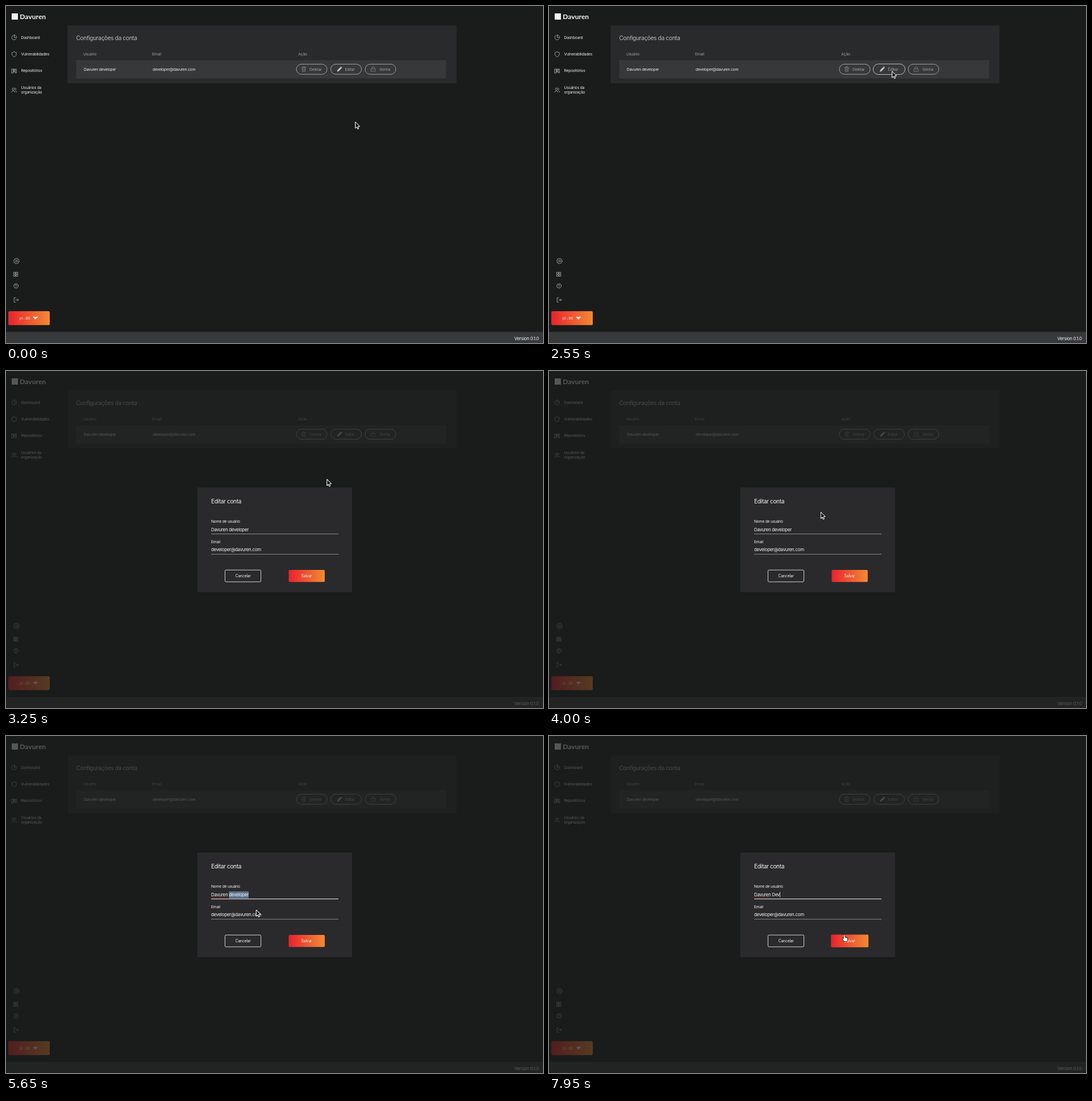
An HTML page with a canvas for the animation above (8000 ms loop, 945 px wide and 593 px high).

```html
<!DOCTYPE html>
<html lang="pt-BR">
<head>
<meta charset="utf-8">
<title>Configurações da conta</title>
<style>
html, body { margin: 0; width: 100%; height: 100%; overflow: hidden; background: #1a1c1b; }
canvas { display: block; width: 945px; height: 593px; }
</style>
</head>
<body>
<canvas id="stage"></canvas>
<script>
const W = 945, H = 593, LOOP = 8000, STEP = 50;
const BRAND = 'Davuren', USER = BRAND + ' developer', MAIL = 'developer@davuren.com';
const canvas = document.getElementById('stage');
const ctx = canvas.getContext('2d');
const dpr = window.devicePixelRatio || 1;
canvas.width = Math.round(W * dpr);
canvas.height = Math.round(H * dpr);

// Pointer path: time, x, y of the hot spot
const PATH = [
  [1150, 614.5, 204], [1400, 617, 184.3], [1550, 617, 184.3], [1900, 608.5, 128.3],
  [2050, 608.5, 128.3], [2300, 603.5, 115], [2850, 603.5, 115], [3250, 564.5, 190.5],
  [3350, 544.5, 204.3], [3400, 544.5, 204.3], [3550, 538.3, 209.2], [3700, 538.3, 209.2],
  [4150, 448, 268], [4550, 411, 280], [4600, 411, 280], [4650, 409.7, 280],
  [5400, 409.7, 280], [5650, 440, 306], [7200, 440, 306], [7600, 493, 333],
  [7700, 493, 333], [7900, 519.5, 350]
];

const ramp = (t, a, b) => Math.min(1, Math.max(0, (t - a) / (b - a)));
const mix = (a, b, k) => a + (b - a) * k;
const inside = ([x, y], l, t, r, b) => x >= l && x <= r && y >= t && y <= b;

function pointerAt(t) {
  const i = PATH.findIndex(p => p[0] > t);
  if (i === 0) return PATH[0].slice(1);
  if (i < 0) return PATH[PATH.length - 1].slice(1);
  const a = PATH[i - 1], b = PATH[i], k = ramp(t, a[0], b[0]);
  return [mix(a[1], b[1], k), mix(a[2], b[2], k)];
}

function setFont(size, family = 'Inter, sans-serif', weight = 400, spacing = -0.035) {
  ctx.font = `${weight} ${size}px ${family}`;
  ctx.letterSpacing = `${size * spacing}px`;
}

// y is the middle of the capital letters
function text(s, x, y, size, color, align = 'left') {
  setFont(size);
  ctx.textAlign = align;
  ctx.fillStyle = color;
  ctx.fillText(s, x, y + size * 0.364);
}

function box(x, y, w, h, r, fill, stroke, line = 0.9) {
  ctx.beginPath();
  ctx.roundRect(x, y, w, h, r);
  if (fill) { ctx.fillStyle = fill; ctx.fill(); }
  if (stroke) { ctx.strokeStyle = stroke; ctx.lineWidth = line; ctx.stroke(); }
}

function warm(x, w) {
  const g = ctx.createLinearGradient(x, 0, x + w, 0);
  g.addColorStop(0, '#ea222d');
  g.addColorStop(1, '#f38a34');
  return g;
}

// Outline icon centred on x, y
function icon(x, y, d, color = '#b4b5b5', line = 0.8, fill = false) {
  ctx.save();
  ctx.translate(x, y);
  ctx.lineWidth = line;
  ctx.lineJoin = ctx.lineCap = 'round';
  ctx.strokeStyle = ctx.fillStyle = color;
  const p = new Path2D(d);
  if (fill) ctx.fill(p);
  ctx.stroke(p);
  ctx.restore();
}

function grow(cx, cy, k, draw) {
  ctx.save();
  ctx.translate(cx, cy);
  ctx.scale(k, k);
  ctx.translate(-cx, -cy);
  draw();
  ctx.restore();
}

const ring = r => `M${r} 0A${r} ${r} 0 1 1 ${-r} 0A${r} ${r} 0 1 1 ${r} 0Z`;

function gearPath() {
  let d = '';
  for (let i = 0; i < 32; i++) {
    const a = (i + 0.5) / 32 * Math.PI * 2, r = i % 4 < 2 ? 5 : 3.9;
    d += `${i ? 'L' : 'M'}${r * Math.cos(a)} ${r * Math.sin(a)}`;
  }
  return d + 'Z' + 'M1.6 0A1.6 1.6 0 1 1 -1.6 0A1.6 1.6 0 1 1 1.6 0Z';
}
const GEAR = gearPath();
const TRASH = 'M-3.8 -2.6H3.8M-1.5 -2.8V-4.2H1.5V-2.8M-2.9 -2.4L-2.4 4.2H2.4L2.9 -2.4M-1 -0.8V2.7M1 -0.8V2.7';
const PENCIL = 'M-3.9 3.9L-3.3 1.6L1.4 -3.1L3.1 -1.4L-1.6 3.3ZM2.1 -3.7L2.7 -4.1L4 -2.8L3.6 -2.2Z';
const LOCK = 'M-3.7 -0.4H3.7V4H-3.7ZM-2.2 -0.5V-2A2.2 2.2 0 0 1 2.2 -2V-0.5';

function sidebar() {
  box(10, 13, 11, 11, 0, '#f2f2f2');
  setFont(12.1, 'Lato, sans-serif', 700, 0);
  ctx.textAlign = 'left';
  ctx.fillStyle = '#f7f7f7';
  ctx.fillText(BRAND, 24.3, 22.8);

  const items = [['Dashboard', 55.5], ['Vulnerabilidades', 85], ['Repositórios', 114],
    ['Usuários da', 143.8], ['organização', 152]];
  for (const [s, y] of items) text(s, 26.5, y, 6.8, '#ececec');

  icon(14.3, 55.3, 'M3.9 1.6A4.2 4.2 0 1 1 -1.5 -3.9M0.2 -4.3V0H4.4A4.3 4.3 0 0 0 0.2 -4.3Z');
  icon(14.3, 85, 'M0 -4.5C1.3 -3.5 2.5 -3.3 3.8 -3.2V0C3.8 2.2 2 3.8 0 4.5C-2 3.8 -3.8 2.2 -3.8 0V-3.2C-2.5 -3.3 -1.3 -3.5 0 -4.5Z');
  icon(14, 114.5, 'M-3.8 -3.6H-1.4V3.6H-3.8ZM0 -3.6H1.2V1.6H0ZM2.6 -3.6H4.4V3H2.6Z');
  icon(14.4, 148, 'M0.4 -1.8A1.9 1.9 0 1 1 -3.4 -1.8A1.9 1.9 0 1 1 0.4 -1.8M-4.4 3.6C-4.2 0.6 1.2 0.6 1.4 3.6M1.5 -3.6A1.8 1.8 0 0 1 1.8 -0.1M2.4 1.2C3.6 1.5 4.2 2.4 4.3 3.6');
  icon(18.4, 448.8, GEAR);
  icon(17.2, 472, 'M-3.5 -3.5H-0.7V-0.7H-3.5ZM0.8 -3.5H3.6V-0.7H0.8ZM-3.5 0.8H-0.7V3.6H-3.5ZM0.8 0.8H3.6V3.6H0.8Z');
  icon(17.6, 492.5, ring(3.9) + 'M-1.2 -0.9A1.2 1.2 0 1 1 0.5 0.1L0 0.5V0.8M0 1.9V2');
  icon(17.8, 517.2, 'M-0.8 -3.9H-3.6V3.9H-0.8M-1 0H4M2.2 -1.8L4 0L2.2 1.8');

  box(4, 537, 73, 24.5, 2, warm(4, 73));
  text('pt - BR', 24, 549.5, 5.9, '#ffe9e4');
  icon(52, 549.2, 'M-4 -2L4 -2L0 2Z', '#fff', 0.5, true);
}

function pill(x, label, path, hover = 0, fill = false) {
  grow(x + 27, 111.2, 1 + 0.04 * hover, () => {
    box(x, 102.4, 54, 17.7, 8.85, null, hover ? '#d0d0d0' : '#b3b3b4', 0.85);
    icon(x + 13 + (fill ? 2.6 : 1.2 * (label === 'Senha')), 111, path, fill ? '#c8c8c8' : '#8f9092', 0.7, fill);
    text(label, label === 'Deletar' ? x + 23 : x + 25, 111.3, 6.8, '#a2a2a4');
  });
}

function page(hover) {
  ctx.fillStyle = '#1a1c1b';
  ctx.fillRect(0, 0, W, H);
  sidebar();

  box(108.4, 34.5, 684.4, 101.5, 1, '#292a2c');
  text('Configurações da conta', 123.5, 56.2, 10.15, '#bcbcbd');
  text('Usuário', 136, 84.4, 6.75, '#a0a0a2');
  text('Email', 257, 84.4, 6.75, '#a0a0a2');
  text('Ação', 514.3, 84.4, 6.75, '#a0a0a2');
  box(123.5, 95.3, 651, 32.2, 1, '#37383a');
  text(USER, 137, 111.4, 6.75, '#f0f0f0');
  text(MAIL, 258, 111.4, 6.75, '#f0f0f0');
  pill(511, 'Deletar', TRASH);
  pill(571.5, 'Editar', PENCIL, hover, true);
  pill(632, 'Senha', LOCK);

  ctx.fillStyle = '#38393b';
  ctx.fillRect(0, 573.5, W, 19.5);
  text('Version 0.1.0', 937.8, 584.8, 7.9, '#f4f4f4', 'right');
}

function nameField(t) {
  const size = 7.9, x = 361;
  setFont(size);
  const brandW = ctx.measureText(BRAND).width;
  const wordX = x + ctx.measureText(BRAND + ' ').width;
  const word = t < 6150 ? 'developer' : 'Dev'.slice(0, t < 6350 ? 1 : t < 6600 ? 2 : 3);
  const endX = wordX + ctx.measureText(word).width;

  if (t >= 5450 && t < 6150) {
    ctx.fillStyle = '#5d7690';
    ctx.fillRect(wordX, 273.5, endX - wordX, 12);
  }
  text(BRAND, x, 278.8, size, '#f4f4f4');
  text(word, wordX, 278.8, size, '#f4f4f4');

  if (t >= 5300) {
    ctx.fillStyle = 'rgba(214, 48, 48, .75)';
    for (let d = x + 0.8; d < x + brandW; d += 1.9) {
      ctx.beginPath();
      ctx.arc(d, 283.4, 0.6, 0, 7);
      ctx.fill();
    }
  }
  if (t >= 6150 && t < 7200 || t >= 7750) {
    ctx.fillStyle = '#f4f4f4';
    ctx.fillRect(endX + 0.2, 274, 0.7, 10);
  }
  ctx.fillStyle = t >= 5100 ? '#c4c4c5' : '#79797b';
  ctx.fillRect(x, 286, 224, 1.3);
}

function modal(t) {
  ctx.fillStyle = 'rgba(26, 28, 27, .72)';
  ctx.fillRect(0, 0, W, H);
  box(336.6, 205, 272.4, 184.3, 1.5, '#2a2a2c');
  text('Editar conta', 361, 229.3, 10.15, '#f4f4f4');

  const k = ramp(t, 2600, 2800), size = mix(7.9, 6.75, k);
  text('Nome de usuário', 361, mix(265.2, 264.9, k), size, '#f4f4f4');
  text('Email', 361, mix(301.3, 300.4, k), size, '#f4f4f4');
  nameField(t);
  text(MAIL, 361, 314.3, 7.9, '#f4f4f4');
  ctx.fillStyle = '#79797b';
  ctx.fillRect(361, 321.8, 224, 1.2);

  box(385.4, 350.2, 63.2, 20.8, 2, null, '#e6e6e6', 0.9);
  text('Cancelar', 417, 360.5, 6.9, '#f4f4f4', 'center');
  grow(529.2, 360.6, 1 + 0.04 * ramp(t, 7800, 7950), () => {
    box(497.5, 350, 63.4, 21.3, 2, warm(497.5, 63.4));
    text('Salvar', 529, 360.5, 6.9, '#fff1ea', 'center');
  });
}

function cursor(t, open) {
  const p = pointerAt(t);
  const onButton = open ? inside(p, 497, 349, 561, 371)
    : t < 2550 && inside(p, 571, 102, 626, 120);
  const onField = open && (inside(p, 361, 272, 585, 287) || inside(p, 361, 308, 585, 323));
  if (onButton) {
    icon(p[0], p[1], 'M-0.9 0.6C-0.9 -0.5 0.8 -0.5 0.9 0.6L1.1 4.2C1.6 3.7 2.6 3.9 2.8 4.6C3.4 4.2 4.3 4.4 4.5 5.2C5.2 4.9 6 5.3 6 6.2C6 8.2 5.2 9 4.9 11.3H-0.4C-0.9 9.4 -2.4 8.4 -3.3 6.9C-3.8 5.9 -2.7 5.3 -2 6L-0.7 7.2Z', '#1a1a1a', 1.2);
    icon(p[0], p[1], 'M-0.6 0.7C-0.6 -0.1 0.5 -0.1 0.6 0.7L1 4.6L5.5 6C5.6 8 4.9 9 4.6 10.9H-0.1C-0.6 9 -2.2 8 -2.9 6.7C-3.2 6 -2.5 5.9 -2.1 6.4L-0.5 7.8Z', '#fff', 0.4, true);
  } else if (onField) {
    const beam = 'M-2.4 -5.5C-1 -5.5 0 -5.2 0 -4.4C0 -5.2 1 -5.5 2.4 -5.5M0 -4.4V4.4M-2.4 5.5C-1 5.5 0 5.2 0 4.4C0 5.2 1 5.5 2.4 5.5M-1.3 1.8H1.3';
    icon(p[0], p[1], beam, '#222', 2);
    icon(p[0], p[1], beam, '#fff', 1);
  } else {
    const arrow = 'M0.4 0.4V10.9L2.8 8.7L4.4 12.4L6.1 11.7L4.5 8.1L7.7 7.8Z';
    icon(p[0], p[1], arrow, '#fff', 1.1);
    ctx.save();
    ctx.translate(p[0], p[1]);
    ctx.fillStyle = '#111';
    ctx.fill(new Path2D(arrow));
    ctx.restore();
    icon(p[0], p[1], arrow, '#fff', 0.8);
  }
}

function frame(now) {
  const t = Math.floor((now % LOOP) / STEP) * STEP;
  const open = t >= 2600;
  ctx.setTransform(dpr, 0, 0, dpr, 0, 0);
  page(open ? 0 : ramp(t, 2150, 2300));
  if (open) modal(t);
  cursor(t, open);
  requestAnimationFrame(() => frame(performance.now() - start));
}

const start = performance.now();
frame(0);
</script>
</body>
</html>
```
